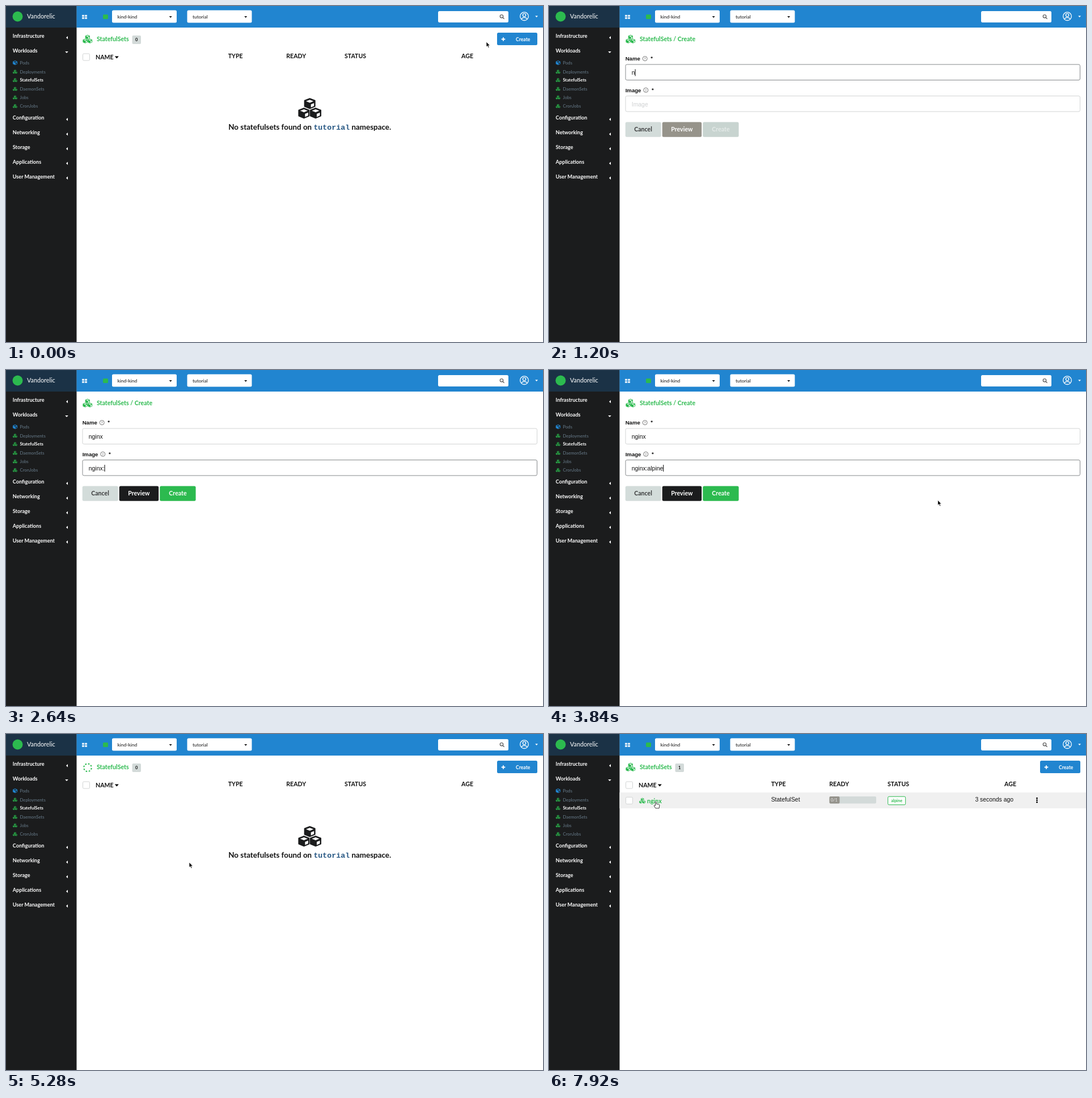
Recreate the animation shown at these times as an HTML page. Size 947 px wide and 592 px high, loop 8 s.

```html
<!DOCTYPE html>
<html lang="en">
<head>
<meta charset="utf-8">
<title>StatefulSets</title>
<style>
  html, body { margin: 0; width: 100%; height: 100%; overflow: hidden; background: #fff; }
  svg { display: block; }
  text { font: 10.6px Lato, sans-serif; fill: #111; white-space: pre; }
  .bold, .menu, .sub.active, .head { font-weight: 700; }
  .menu { font-size: 9.1px; fill: #fff; }
  .sub { font-size: 7.75px; fill: #687c8b; }
  .sub.active { fill: #fff; }
  .select { font-size: 8.45px; }
  .empty { font-size: 13.4px; font-weight: 700; }
  .empty tspan { font-family: "Liberation Mono", monospace; font-size: 13.3px; fill: #245582; }
  .sans { font: 10.4px "Liberation Sans", sans-serif; }
  .label { font: 700 9.6px "Liberation Sans", sans-serif; }
  .green { fill: #2cba4f; }
  .white { fill: #fff; }
  .mid { text-anchor: middle; }
  .box { fill: #fff; stroke: #d2d4d4; }
  .icon { color: #2cba4f; --hole: #fff; }
  .side { --hole: #1b1c1d; }
</style>
</head>
<body>
<svg width="947" height="592" viewBox="0 0 947 592">
  <defs>
    <g id="cube">
      <path d="M0-8.5 9-5V5L0 8.8-9 5V-5Z" fill="currentColor" stroke="currentColor" stroke-width="2" stroke-linejoin="round"/>
      <path d="M0-6.6 6.6-4 0-1.4-6.6-4ZM2 1.5 7.5-.9V4.4L2 7Z" fill="var(--hole)"/>
    </g>
    <g id="cubes">
      <use href="#cube" y="-8.4"/><use href="#cube" x="-10.3" y="8.4"/><use href="#cube" x="10.3" y="8.4"/>
    </g>
    <g id="help">
      <circle r="4" fill="none" stroke="#555" stroke-width=".8"/>
      <text class="mid" y="2.4" style="font-size:6.5px;fill:#444">?</text>
    </g>
  </defs>

  <rect width="947" height="592" fill="#fff"/>
  <rect width="124.5" height="592" fill="#1b1c1d"/>
  <rect width="124.5" height="38" fill="#1b3246"/>
  <circle cx="20.5" cy="18.5" r="9" fill="#2cba4f"/>
  <text x="37" y="22.2" class="white" style="font-size:10.8px">Vandorelic</text>
  <g id="sidebar"></g>

  <rect x="124.5" width="822.5" height="38" fill="#2185d0"/>
  <path d="M134 15.8h4v3h-4zM139 15.8h4v3h-4zM134 19.8h4v3h-4zM139 19.8h4v3h-4z" fill="#e8f2fa"/>
  <rect x="171" y="15" width="9" height="8" rx="1.5" class="green"/>
  <rect x="187" y="7.5" width="114" height="22" rx="2.5" class="white"/>
  <rect x="319.5" y="7.5" width="114" height="22" rx="2.5" class="white"/>
  <text x="196.5" y="22" class="select">kind-kind</text>
  <text x="329" y="22" class="select">tutorial</text>
  <path d="M287.7 18h5l-2.5 2.7zM420.2 18h5l-2.5 2.7z"/>
  <rect x="762" y="9" width="124" height="20" rx="2.5" class="white"/>
  <g fill="none" stroke="#555" stroke-width="1.2"><circle cx="874" cy="18.2" r="2.7"/><path d="M876 20.3l2.6 2.5"/></g>
  <g fill="none" stroke="#fff" stroke-width="1.3">
    <circle cx="914" cy="18.2" r="7.3"/><circle cx="914" cy="16" r="2.7"/><path d="M909 23.4q1-3 5-3t5 3"/>
  </g>
  <path d="M933.2 17.3h4.8l-2.4 2.6z" class="white"/>

  <g id="headIcon" class="icon"><use href="#cubes" transform="translate(143.8 58.2) scale(.41)"/></g>
  <circle id="spinner" cx="144" cy="59.2" r="6.8" fill="none" stroke="#2cba4f" stroke-width="2" stroke-dasharray="2.7 2.64"/>
  <text id="title" x="160" y="62" class="bold green"></text>

  <g id="list">
    <rect x="222.5" y="52" width="15.5" height="15" rx="2" fill="#d3dad9"/>
    <text id="count" x="230.2" y="62.3" class="mid" style="font-size:7.5px;font-weight:700"></text>
    <rect x="866" y="47" width="71" height="22" rx="2.5" fill="#2185d0"/>
    <path d="M873.7 58.5h6.6M877 55.2v6.6" stroke="#fff" stroke-width="1.8"/>
    <text x="911.7" y="61.7" class="bold white mid" style="font-size:8.6px">Create</text>
    <rect x="135.5" y="84" width="12" height="12" rx="1.8" class="box"/>
    <text x="158" y="93.9" class="head">NAME</text>
    <path d="M191.8 88.5h7l-3.5 4z"/>
    <text x="391.7" y="91.8" class="head">TYPE</text>
    <text x="494.3" y="91.8" class="head">READY</text>
    <text x="597" y="91.8" class="head">STATUS</text>
    <text x="824" y="91.8" class="head" text-anchor="end">AGE</text>
    <g id="empty">
      <g style="color:#1b1c1d;--hole:#fff"><use href="#cubes" transform="translate(535.7 180.2)"/></g>
      <text y="218.3" class="empty mid" x="535.7">No statefulsets found on <tspan>tutorial</tspan> namespace.</text>
    </g>
    <g id="row">
      <rect x="124.5" y="103" width="822.5" height="28" fill="#f0f0f0"/>
      <rect x="135.5" y="111.3" width="12" height="12" rx="1.8" class="box"/>
      <g class="icon" style="--hole:#f0f0f0"><use href="#cubes" transform="translate(164.7 117.5) scale(.27)"/></g>
      <text x="173" y="121.5" class="bold green">nginx</text>
      <text x="391.7" y="119.4" class="sans" font-style="italic">StatefulSet</text>
      <rect x="494.5" y="110" width="82.5" height="12.5" rx="2" fill="#d3dad9"/>
      <rect x="494.5" y="110" width="18" height="12.5" rx="2" fill="#95938c"/>
      <text x="497" y="118.5" style="font-size:7.2px;fill:#eee">0/1</text>
      <rect x="597.7" y="110.2" width="31" height="14.5" rx="2" fill="#fff" stroke="#2cba4f"/>
      <text x="613.2" y="119.6" class="bold green mid" style="font-size:7.4px">alpine</text>
      <text id="age" x="819" y="119.4" class="sans" text-anchor="end"></text>
      <g><circle cx="860.5" cy="113.2" r="1.4"/><circle cx="860.5" cy="116.7" r="1.4"/><circle cx="860.5" cy="120.2" r="1.4"/></g>
    </g>
  </g>

  <g id="form">
    <text x="134.7" y="96.2" class="label">Name</text><use href="#help" x="169.2" y="92.7"/><text x="179.2" y="95" class="label">*</text>
    <text x="134.7" y="151.7" class="label">Image</text><use href="#help" x="170.8" y="148.2"/><text x="181" y="150.5" class="label">*</text>
    <rect id="nameBox" x="135" y="103" width="801.5" height="27.5" rx="2.5" class="box"/>
    <rect id="imageBox" x="135" y="158.5" width="801.5" height="27.5" rx="2.5" class="box"/>
    <text id="name" x="145.8" y="121.4" class="sans"></text>
    <text id="image" x="145.8" y="177" class="sans"></text>
    <path id="caret" d="M.5-10V2" stroke="#000" stroke-width="1"/>
    <rect x="134.7" y="204.5" width="63" height="26.3" rx="2.5" fill="#d3dcda"/>
    <rect id="preview" x="199.7" y="204.5" width="69.5" height="26.3" rx="2.5"/>
    <rect id="create" x="271.3" y="204.5" width="63.3" height="26.3" rx="2.5"/>
    <text x="166" y="221.2" class="bold mid" style="fill:#38393a">Cancel</text>
    <text x="234.4" y="221.2" class="bold mid white">Preview</text>
    <text id="createText" x="303" y="221.2" class="bold mid">Create</text>
  </g>

  <g id="pointer" stroke="#fff" stroke-width=".8" stroke-linejoin="round">
    <path id="arrow" d="M0 0V9.2L2.1 7.3 3.6 10.8 5.2 10.1 3.7 6.8H6.5Z"/>
    <path id="hand" d="M-1 1Q0-.6 1 1V4.3L5.3 5Q6.6 5.4 6.4 7L5.6 11.8H-.6L-3.2 7.6Q-3.3 6-1 7.2Z" fill="#fff" stroke="#111"/>
  </g>
</svg>
<script>
const $ = id => document.getElementById(id);
const show = (id, on) => $(id).style.display = on ? '' : 'none';
const LOOP = 8000, STEP = 120;
const FORM_OPEN = 600, FORM_CLOSE = 5160, TAB = 2040, ROW = 5520;

const menus = { Infrastructure: 53, Workloads: 79, Configuration: 197, Networking: 223, Storage: 248.7, Applications: 274.5, 'User Management': 300.3 };
const items = { Pods: 100, Deployments: 115.7, StatefulSets: 130.5, DaemonSets: 146, Jobs: 161, CronJobs: 176.3 };
let markup = '';
for (const [label, y] of Object.entries(menus)) {
  const caret = label === 'Workloads' ? `M104.2 ${y + 1}h5.6l-2.8 3z` : `M109 ${y}v5.6l-3-2.8z`;
  markup += `<text class="menu" x="11.8" y="${y + 3.2}">${label}</text><path class="white" d="${caret}"/>`;
}
for (const [label, y] of Object.entries(items)) {
  const pod = label === 'Pods';
  const icon = `<use href="#${pod ? 'cube' : 'cubes'}" transform="translate(16 ${y}) scale(${pod ? .4 : .19})"/>`;
  markup += `<g class="icon side"${pod ? ' style="color:#2185d0"' : ''}>${icon}</g>` +
    `<text class="sub${label === 'StatefulSets' ? ' active' : ''}" x="24.5" y="${y + 2.8}">${label}</text>`;
}
$('sidebar').innerHTML = markup;

// Times at which each character appears
const nameKeys = [1080, 1320, 1440, 1560, 1800];
const imageKeys = [2160, 2280, 2400, 2400, 2520, 2640, 2880, 3000, 3120, 3240, 3360, 3480];
const typed = (text, keys, t) => text.slice(0, keys.filter(k => k <= t).length);

// Pointer path: time, x, y
const path = [[0, 847, 63], [120, 847, 63], [480, 889, 59], [3720, 712, 229], [4440, 356, 231],
  [4800, 337, 226], [4920, 323, 226], [5400, 323, 226], [6120, 188.5, 119], [8000, 188.5, 119]];
const ease = p => p * p * (3 - 2 * p);

function pointerAt(t) {
  if (t >= 480 && t < 3720) return [889, 59];
  const i = path.findIndex(p => p[0] > t);
  const [t0, x0, y0] = path[i - 1], [t1, x1, y1] = path[i];
  const p = ease((t - t0) / (t1 - t0));
  return [x0 + (x1 - x0) * p, y0 + (y1 - y0) * p];
}

function setField(id, value, placeholder, focused) {
  $(id).textContent = value || placeholder;
  $(id).style.fill = value ? '#111' : '#cfd1d2';
  $(id + 'Box').style.stroke = focused ? '#85898b' : '#d2d4d4';
}

function drawForm(t) {
  const onImage = t >= TAB, name = typed('nginx', nameKeys, t), image = typed('nginx:alpine', imageKeys, t);
  setField('name', name, 'Name', !onImage);
  setField('image', image, 'Image', onImage);
  const ready = name && image;
  $('preview').style.fill = ready ? '#1b1c1d' : '#96938a';
  $('create').style.fill = ready ? '#2cba4f' : '#c8d4d0';
  $('createText').style.fill = ready ? '#fff' : '#e4eae8';

  const field = onImage ? 'image' : 'name';
  const width = (onImage ? image : name) ? $(field).getComputedTextLength() : 0;
  const last = Math.max(FORM_OPEN, ...[...nameKeys, TAB, ...imageKeys].filter(k => k <= t));
  show('caret', Math.floor((t - last) / 440) % 2 === 0);
  $('caret').setAttribute('transform', `translate(${145.8 + width} ${onImage ? 177 : 121.4})`);
}

function draw(now) {
  const t = Math.floor(now % LOOP / STEP) * STEP;
  const form = t >= FORM_OPEN && t < FORM_CLOSE, row = t >= ROW;
  const loading = t >= FORM_CLOSE && !row;
  show('form', form);
  show('list', !form);
  show('row', row);
  show('empty', !row);
  show('spinner', loading);
  show('headIcon', !loading);
  $('title').textContent = form ? 'StatefulSets / Create' : 'StatefulSets';
  $('count').textContent = row ? 1 : 0;
  $('spinner').setAttribute('transform', `rotate(${t * .18} 144 59.2)`);
  const seconds = t >= 6960 ? 3 : t >= 5960 ? 2 : 1;
  $('age').textContent = `${seconds} second${seconds > 1 ? 's' : ''} ago`;
  if (form) drawForm(t);

  const [x, y] = pointerAt(t);
  const hand = t >= 360 && t < FORM_OPEN || t >= 4920 && t < FORM_CLOSE || t >= 6120;
  show('pointer', t < 1080 || t >= 3720);
  show('hand', hand);
  show('arrow', !hand);
  $('pointer').setAttribute('transform', `translate(${x} ${y})`);
}

function frame() {
  draw(performance.now());
  requestAnimationFrame(frame);
}
frame();
</script>
</body>
</html>
```
